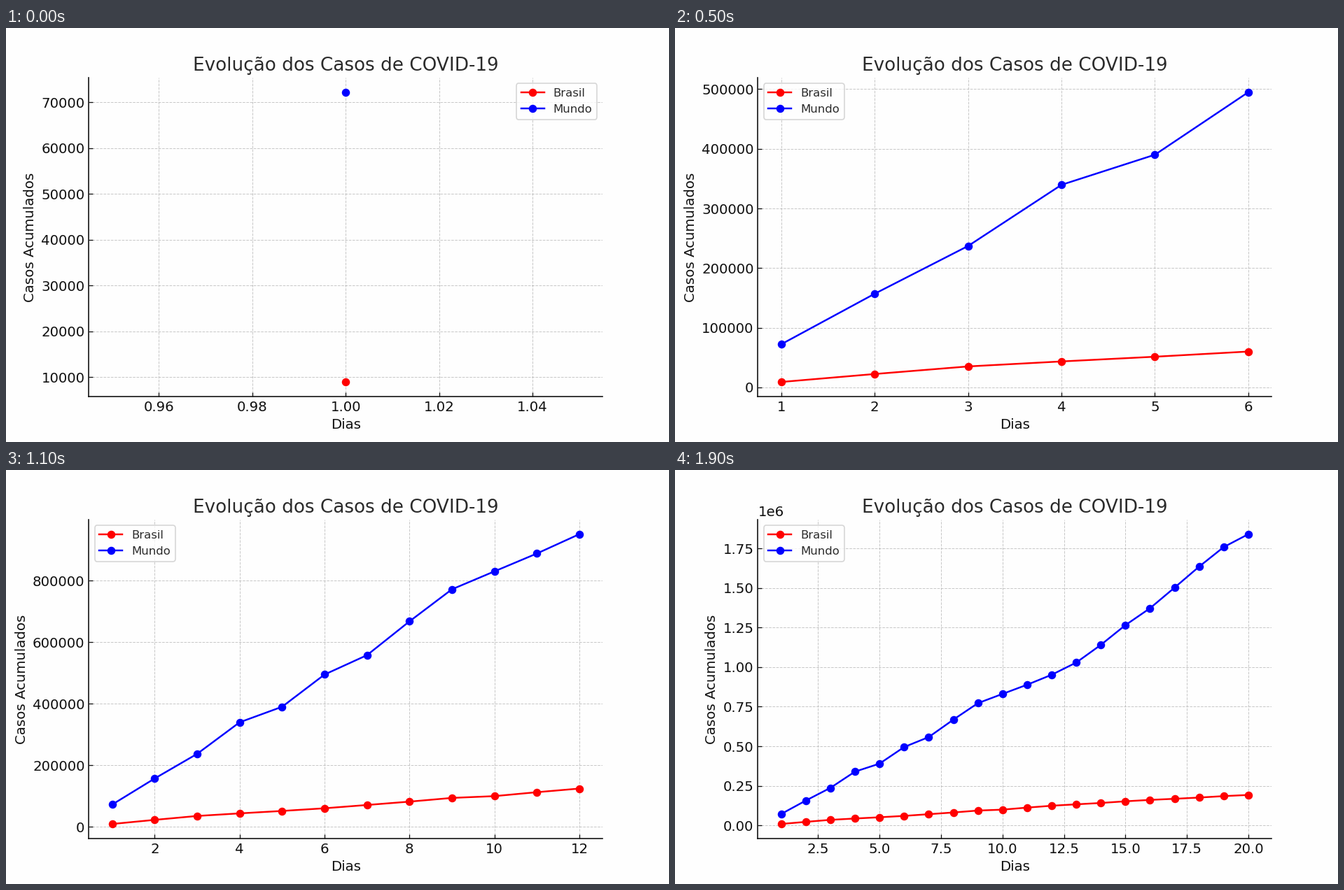
Write a matplotlib script that moves like this. It is 947 by 592 pixels and loops after 2000 ms.

```python
import numpy as np
import matplotlib.pyplot as plt
from matplotlib.animation import FuncAnimation

W, H, DPI = 947, 592, 118.375
PAPER, INK, SOFT = "#fefefe", "#111111", "#2b2b2b"

plt.rcParams.update({
    "font.family": "DejaVu Sans",
    "text.color": SOFT,
    "figure.facecolor": PAPER,
    "axes.facecolor": PAPER,
    "axes.edgecolor": INK,
    "axes.labelcolor": INK,
    "axes.linewidth": 1.0,
    "axes.titlesize": 16,
    "axes.labelsize": 12,
    "axes.spines.top": False,
    "axes.spines.right": False,
    "xtick.color": INK,
    "ytick.color": INK,
    "xtick.labelsize": 12,
    "ytick.labelsize": 12,
    "xtick.direction": "in",
    "ytick.direction": "in",
    "legend.fontsize": 10,
    "grid.color": "#b0b0b0",
    "grid.linestyle": "--",
    "grid.linewidth": 0.6,
    "grid.alpha": 0.7,
})

# Cumulative cases per day, in thousands
brazil = 1000 * np.array([
    8.95, 22.3, 35.0, 43.4, 51.3, 60.0, 70.7, 81.6, 93.7, 99.5,
    112.3, 124.1, 133.1, 141.6, 152.2, 161.0, 168.0, 175.8, 185.0, 192.2])
world = 1000 * np.array([
    72.2, 156.9, 237.0, 339.6, 390.1, 495.0, 558.0, 667.9, 772.2, 830.5,
    888.6, 951.5, 1028.7, 1140.4, 1265.2, 1371.8, 1502.3, 1635.0, 1758.5, 1839.8])
days = np.arange(1, len(world) + 1)

# The small surplus keeps the pixel size from rounding down
fig, ax = plt.subplots(figsize=((W + 1e-3) / DPI, (H + 1e-3) / DPI), dpi=DPI)


def draw(frame):
    n = frame + 1
    ax.clear()
    ax.plot(days[:n], brazil[:n], color="red", marker="o", label="Brasil")
    ax.plot(days[:n], world[:n], color="blue", marker="o", label="Mundo")
    ax.set_title("Evolução dos Casos de COVID-19")
    ax.set_xlabel("Dias")
    ax.set_ylabel("Casos Acumulados")
    ax.grid(True)
    ax.legend()
    return ax.lines


anim = FuncAnimation(fig, draw, frames=len(days), interval=100,
                     repeat=True, repeat_delay=0, blit=False)
plt.show()
```
